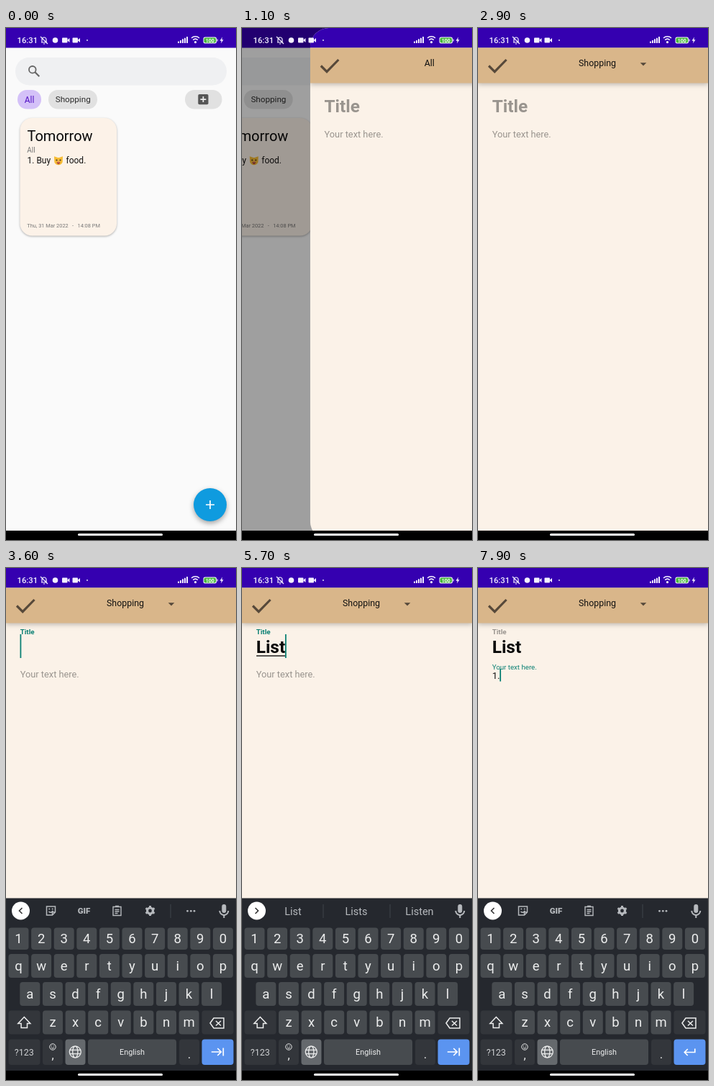
These frames come from a looping animation (320 by 711 pixels, 8 s). An HTML page with a canvas:

```html
<!DOCTYPE html>
<html lang="en">
<head>
<meta charset="utf-8">
<title>Notes app</title>
<style>
html, body { margin: 0; width: 100%; height: 100%; overflow: hidden; background: #000; }
canvas { display: block; width: 320px; height: 711px; }
</style>
</head>
<body>
<canvas id="stage"></canvas>
<script>
const W = 320, H = 711, LOOP = 8000, STEP = 100;
const canvas = document.getElementById('stage');
const c = canvas.getContext('2d');
const dpr = window.devicePixelRatio || 1;
canvas.width = W * dpr;
canvas.height = H * dpr;

const PURPLE = '#3500b0', CREAM = '#fbf2e8', TAN = '#d9b68a', TEAL = '#0b8074', HINT = '#99948e';
const KEY = '#474b4f', DARK_KEY = '#33363b', GLYPH = '#eceded', SOFT = '#b6b9bd';

// Moments of the story, in ms
const SLIDE = 950, MENU_IN = 2000, MENU_OUT = 2600, PICK = 2550;
const FOCUS_TITLE = 3150, SHIFT = 4100, FOCUS_BODY = 6250;
// down, up, x, y, typed key
const taps = [
  [700, 900, 284, 663], [1850, 1950, 180, 50], [2450, 2550, 165, 88],
  [3000, 3150, 60, 110], [4000, 4100, 25, 631], [4400, 4550, 286, 592, 'L'],
  [4850, 4950, 229, 553, 'i'], [5200, 5300, 68, 592, 's'], [5600, 5700, 145, 553, 't'],
  [6100, 6200, 294, 672], [7050, 7150, 18, 516, '1'], [7500, 7600, 255, 672, '.']
];
const suggestions = {
  L: ['L', 'Love', 'Let'], Li: ['Li', 'Like', 'Life'],
  Lis: ['Lis', 'List', 'Listen'], List: ['List', 'Lists', 'Listen']
};
const keyRows = [['1234567890', 499.5, 30.5, 17.5], ['qwertyuiop', 536, 33, 17.5],
  ['asdfghjkl', 575, 33, 33.3], ['zxcvbnm', 614.5, 33, 65]];
const PITCH = 31.6;

const clamp = v => Math.max(0, Math.min(1, v));
const ramp = (t, from, length) => clamp((t - from) / length);
const easeOut = x => 1 - (1 - x) ** 3;
const mix = (a, b, k) => a + (b - a) * k;

function text(s, x, y, size, color, align = 'left', weight = 400) {
  c.font = `${weight} ${size}px Roboto, "Noto Sans", sans-serif`;
  c.textAlign = align;
  c.fillStyle = color;
  c.fillText(s, x, y);
}
function rect(x, y, w, h, color) {
  c.fillStyle = color;
  c.fillRect(x, y, w, h);
}
function box(x, y, w, h, r, color) {
  c.beginPath();
  c.roundRect(x, y, w, h, r);
  c.fillStyle = color;
  c.fill();
}
function disc(x, y, r, color) {
  c.beginPath();
  c.arc(x, y, r, 0, 7);
  c.fillStyle = color;
  c.fill();
}
function line(d, x, y, color, width = 1.5) {
  c.save();
  c.translate(x, y);
  c.strokeStyle = color;
  c.lineWidth = width;
  c.stroke(new Path2D(d));
  c.restore();
}
function shape(d, x, y, color) {
  c.save();
  c.translate(x, y);
  c.fillStyle = color;
  c.fill(new Path2D(d), 'evenodd');
  c.restore();
}
function shadowed(blur, dy, alpha, draw) {
  c.save();
  c.shadowColor = `rgba(0,0,0,${alpha})`;
  c.shadowBlur = blur * dpr;
  c.shadowOffsetY = dy * dpr;
  draw();
  c.restore();
}

function statusIcons() {
  const white = '#f4f0ff';
  text('16:31', 15.5, 21, 11.3, white, 'left', 500);
  line('M-4 3H4M-3 3V-1A3 3 0 0 1 3-1V3M-1 5H1M-5-5L5 5', 53, 17, white, 1.2);
  disc(68.5, 17, 3.8, white);
  for (const x of [78, 92.5]) {
    box(x, 13.5, 7.5, 7, 1, white);
    shape('M0 0L3.5-3V3Z', x + 7, 17, white);
  }
  disc(113, 17, .9, white);
  for (let i = 0; i < 5; i++) box(239 + i * 3, 18.5 - i * 1.6, 2, 2.5 + i * 1.6, .5, white);
  line('M-5.5-2A8 8 0 0 1 5.5-2M-3.3 .6A5 5 0 0 1 3.3 .6', 263.5, 16, white, 1.5);
  disc(263.5, 19.7, 1.6, white);
  box(274.5, 12.5, 18.5, 9, 2.5, white);
  box(275.5, 13.5, 16.5, 7, 1.8, '#47b83c');
  rect(293.5, 15.5, 1.2, 3, white);
  text('100', 283.8, 19.6, 7, '#fff', 'center', 700);
  shape('M1-4.5L-2.5 .7H-.3L-1 4.5L2.5-.8H.3Z', 300, 17, white);
}

function cat(x, y) {
  shape('M-6-6L-1-4.2H1L6-6L5.7 2Q4 6 0 6T-5.7 2Z', x, y, '#f6bd35');
  disc(x - 2.5, y - .8, 1.1, '#4a3520');
  disc(x + 2.5, y - .8, 1.1, '#4a3520');
  shape('M-2.8 2H2.8Q1.5 5 0 5T-2.8 2Z', x, y, '#b5493f');
  disc(x, y + 1.2, .9, '#e58a83');
}

function home(t) {
  rect(-80, 0, 480, H, '#fafafa');
  rect(-80, 0, 480, 27.5, PURPLE);
  box(13, 41, 294, 38.5, 19, '#eff0f2');
  c.beginPath();
  c.arc(36.8, 57.8, 4.8, 0, 7);
  c.strokeStyle = '#666';
  c.lineWidth = 1.8;
  c.stroke();
  line('M0 0L6 6', 40.3, 61.3, '#666', 2.2);
  box(16, 86, 33, 26.5, 13, '#d4c1f8');
  text('All', 32.6, 103.5, 12, '#5312c4', 'center');
  box(59, 86, 68, 26.5, 13, '#e1e1e1');
  text('Shopping', 93.2, 103.3, 11.7, '#2c2c2c', 'center');
  box(249, 86, 51.5, 26.5, 13, '#e1e1e1');
  box(267.3, 92, 14.2, 14.2, 1.8, '#555');
  line('M-4 0H4M0-4V4', 274.4, 99.1, '#eee', 1.7);

  shadowed(3, 1, .3, () => box(19.5, 125, 134.5, 163.5, 17, '#fcf2e8'));
  text('Tomorrow', 29.5, 157, 20, '#080808');
  text('All', 29.3, 173, 10, '#777');
  text('1. Buy', 29.5, 188.3, 12, '#111');
  cat(73, 184.3);
  text('food.', 83.5, 188.3, 12, '#111');
  text('Thu, 31 Mar 2022', 29.3, 276.7, 7.4, '#777');
  text('-', 93, 276.7, 7.4, '#777', 'center');
  text('14:08 PM', 99.5, 276.7, 7.4, '#777');

  const pressed = t >= 700 && t < 1000;
  shadowed(7, 3, .35, () => disc(284, 662, 23, pressed ? '#3aaee8' : '#0f9bdf'));
  line('M-6 0H6M0-6V6', 284, 662, '#fff', 1.7);
}

function typed(t, from, to) {
  return taps.filter(p => p[4] && p[1] <= t && p[1] > from && p[1] < to).map(p => p[4]).join('');
}

function cursor(t, x, y, h) {
  const events = [FOCUS_TITLE, FOCUS_BODY, ...taps.filter(p => p[4]).map(p => p[1])];
  const last = Math.max(...events.filter(e => e <= t));
  if ((t - last) % 1000 < 500) rect(x, y, 1.8, h, TEAL);
}

function editor(t) {
  rect(0, 0, W, H, CREAM);
  rect(0, 0, W, 27.5, PURPLE);
  shadowed(6, 2, .22, () => rect(0, 27.5, W, 49, TAN));
  line('M0 0L8.2 8.2L24.5-8.5', 15, 52.5, '#57493a', 3.2);
  text(t < PICK ? 'All' : 'Shopping', 166, 52.8, 12.4, '#111', 'center');
  shape('M-4.3-2H4.3L0 2.3Z', 230, 50.3, '#55483a');

  const inTitle = t >= FOCUS_TITLE && t < FOCUS_BODY, inBody = t >= FOCUS_BODY;
  const title = typed(t, 0, FOCUS_BODY), body = typed(t, FOCUS_BODY, LOOP);
  const a = ramp(t, FOCUS_TITLE, 150), b = ramp(t, FOCUS_BODY, 150);
  text('Title', 19.7, mix(117, 92.3, a), mix(24.4, 9.8, a), inTitle ? TEAL : HINT, 'left', 700);
  text(title, 19.7, 118, 24.4, '#080808', 'left', 700);
  const end = 19.5 + c.measureText(title).width;
  if (inTitle) {
    if (title) rect(20, 121.3, end - 20, 1.4, '#111');
    cursor(t, end, 92, 33);
  }
  text('Your text here.', 19.7, mix(152.2, 140.5, b), mix(12.8, 9.7, b), inBody ? TEAL : HINT);
  text(body, 19.7, 154, 13, '#111');
  if (inBody) cursor(t, 19.5 + c.measureText(body).width, 140, 17.5);
}

function menu(t) {
  const k = ramp(t, MENU_IN, 150) * (1 - ramp(t, MENU_OUT, 100));
  if (!k) return;
  c.save();
  c.globalAlpha = k;
  shadowed(7, 2, .3, () => box(128, 29, 117, 80, 2, '#fff'));
  if (t >= 2450) rect(128, 69, 117, 40, '#e4e4e4');
  text('All', 166, 53, 12.4, '#111', 'center');
  text('Shopping', 166, 93, 12.4, '#111', 'center');
  c.restore();
}

function toolbar(words) {
  disc(20.5, 476, 12.5, '#fff');
  line(words ? 'M-2-4L2 0L-2 4' : 'M2-4L-2 0L2 4', 20.5, 476, '#333', 1.6);
  shape('M12 14a3 3 0 0 0 3-3V5a3 3 0 0 0-6 0v6a3 3 0 0 0 3 3zM17 11a5 5 0 0 1-10 0H5a7 7 0 0 0 6 6.9V21h2v-3.1A7 7 0 0 0 19 11z', 291.3, 465, SOFT);
  if (words) {
    words.forEach((w, i) => text(w, 71 + 88 * i, 482, 14.5, SOFT, 'center'));
    rect(112.5, 467, 1, 19, '#41444a');
    rect(205.5, 467, 1, 19, '#41444a');
    return;
  }
  line('M-6-6H6V2L2 6H-6ZM6 2H2V6M-3 1Q0 4 3 0', 62.5, 476, SOFT, 1.5);
  disc(60.3, 473.6, 1, SOFT);
  disc(64.7, 473.6, 1, SOFT);
  text('GIF', 108.5, 480.2, 11.5, SOFT, 'center', 900);
  line('M-5.5-5H5.5V7H-5.5ZM-2.5-6H2.5M-3-1H3M-3 1.5H3M-3 4H1', 154.5, 475.5, SOFT, 1.4);
  c.beginPath();
  c.arc(200.5, 476, 4, 0, 7);
  c.strokeStyle = SOFT;
  c.lineWidth = 3.2;
  c.stroke();
  for (let i = 0; i < 6; i++) {
    const u = Math.cos(i * Math.PI / 3 + .52), v = Math.sin(i * Math.PI / 3 + .52);
    line(`M${u * 4} ${v * 4}L${u * 7} ${v * 7}`, 200.5, 476, SOFT, 3);
  }
  rect(228.5, 467, 1, 19, '#41444a');
  for (const x of [252.5, 257.3, 262]) disc(x, 476.3, 1.4, SOFT);
}

function keyboard(t) {
  const slide = easeOut(ramp(t, 3200, 300));
  if (!slide) return;
  const held = taps.find(p => p[4] && t >= p[0] && t < p[1]);
  const upper = t >= SHIFT && t < 4550;
  const title = typed(t, 0, FOCUS_BODY);
  let bubble = null;

  c.save();
  c.translate(0, (1 - slide) * 240);
  rect(0, 458.5, W, 253, '#25282e');
  toolbar(t < FOCUS_BODY && suggestions[title]);
  for (const [keys, y, h, x0] of keyRows) [...keys].forEach((k, i) => {
    const x = x0 + i * PITCH, label = upper ? k.toUpperCase() : k;
    box(x - 14, y, 28, h, 4, KEY);
    text(label, x, y + h / 2 + 6.3, 18.5, GLYPH, 'center');
    if (held && held[4] === label) bubble = [label, x, y, h];
  });

  box(3.5, 614.5, 44, 33, 4, DARK_KEY);
  const arrow = 'M0-8L8.5 1H4.2V7H-4.2V1H-8.5Z';
  if (upper) shape(arrow, 25.3, 631.5, GLYPH);
  line(arrow, 25.3, 631.5, GLYPH, 1.5);
  box(272.5, 614.5, 44, 33, 4, DARK_KEY);
  line('M-10 0L-5-7H9V7H-5ZM-2-3L5 3.5M5-3L-2 3.5', 294, 632, GLYPH, 1.5);

  box(3.5, 654.5, 44, 35.5, 4, DARK_KEY);
  text('?123', 25.3, 676.5, 12.5, '#cfd1d3', 'center');
  box(51, 654.5, 28, 35.5, 4, DARK_KEY);
  line('M4.2 0A4.2 4.2 0 1 1-4.2 0A4.2 4.2 0 1 1 4.2 0M-2 1.2Q0 3.2 2 1.2M-1.5-1.6V-.5M1.5-1.6V-.5', 65, 665, GLYPH, 1);
  text(',', 65, 682, 16, GLYPH, 'center');
  box(82.5, 654.5, 28, 35.5, 4, '#65696d');
  line('M8 0A8 8 0 1 1-8 0A8 8 0 1 1 8 0M3.6 0A3.6 8 0 1 1-3.6 0A3.6 8 0 1 1 3.6 0M-7.4-2.7H7.4M-7.4 2.7H7.4', 96.3, 672, GLYPH, 1.3);
  box(114, 654.5, 123, 35.5, 4, KEY);
  text('English', 175.5, 676, 10.8, GLYPH, 'center');
  box(241, 654.5, 28, 35.5, 4, DARK_KEY);
  text('.', 255, 680.5, 17, GLYPH, 'center');
  if (held && held[4] === '.') bubble = ['.', 255, 654.5, 35.5];
  box(272.5, 654.5, 44, 35.5, 4, t >= 6100 && t < 6200 ? '#82aff5' : '#5b94f0');
  line(t < FOCUS_BODY ? 'M-8.5 0H5M0-5L5 0L0 5M8-5.5V5.5' : 'M7.5-4.5V.5H-7M-2.5-4L-7 .5L-2.5 5', 294.3, 672, '#fff', 1.7);

  if (bubble) {
    const [label, x, y, h] = bubble;
    const left = Math.max(2, Math.min(x - 15.5, W - 33));
    shadowed(3, 1, .3, () => box(left, y - 58, 31, h + 58, 5, '#373a3f'));
    text(label, left + 15.5, y - 26, 23, GLYPH, 'center');
    for (let i = 0; i < 3; i++) disc(left + 20.5 + i * 3, y - 17, .8, GLYPH);
  }
  c.restore();
}

function touch(t) {
  const p = taps.find(q => t >= q[0] && t < q[1]);
  if (!p) return;
  const g = c.createRadialGradient(p[2], p[3], 1, p[2], p[3], 9.5);
  g.addColorStop(0, 'rgba(228,228,236,.95)');
  g.addColorStop(.55, 'rgba(196,196,206,.9)');
  g.addColorStop(1, 'rgba(120,120,132,.6)');
  disc(p[2], p[3], 9.5, g);
}

function render(t) {
  c.setTransform(dpr, 0, 0, dpr, 0, 0);
  const p = easeOut(ramp(t, SLIDE, 450));
  if (p < 1) {
    c.save();
    c.translate(-80 * p, 0);
    home(t);
    c.restore();
    rect(0, 0, W, H, `rgba(0,0,0,${.52 * p})`);
  }
  if (p > 0) {
    c.save();
    c.translate(W * (1 - p), 0);
    c.beginPath();
    c.roundRect(0, 0, W, H, p < 1 ? 26 : 0);
    c.clip();
    editor(t);
    c.restore();
  }
  menu(t);
  keyboard(t);
  statusIcons();
  rect(0, 698, W, 13, '#000');
  box(100, 702, 118, 3, 1.5, '#fff');
  touch(t);
}

const start = performance.now();
function frame() {
  const t = (performance.now() - start) % LOOP;
  render(Math.floor(t / STEP) * STEP);
  requestAnimationFrame(frame);
}
frame();
</script>
</body>
</html>
```
